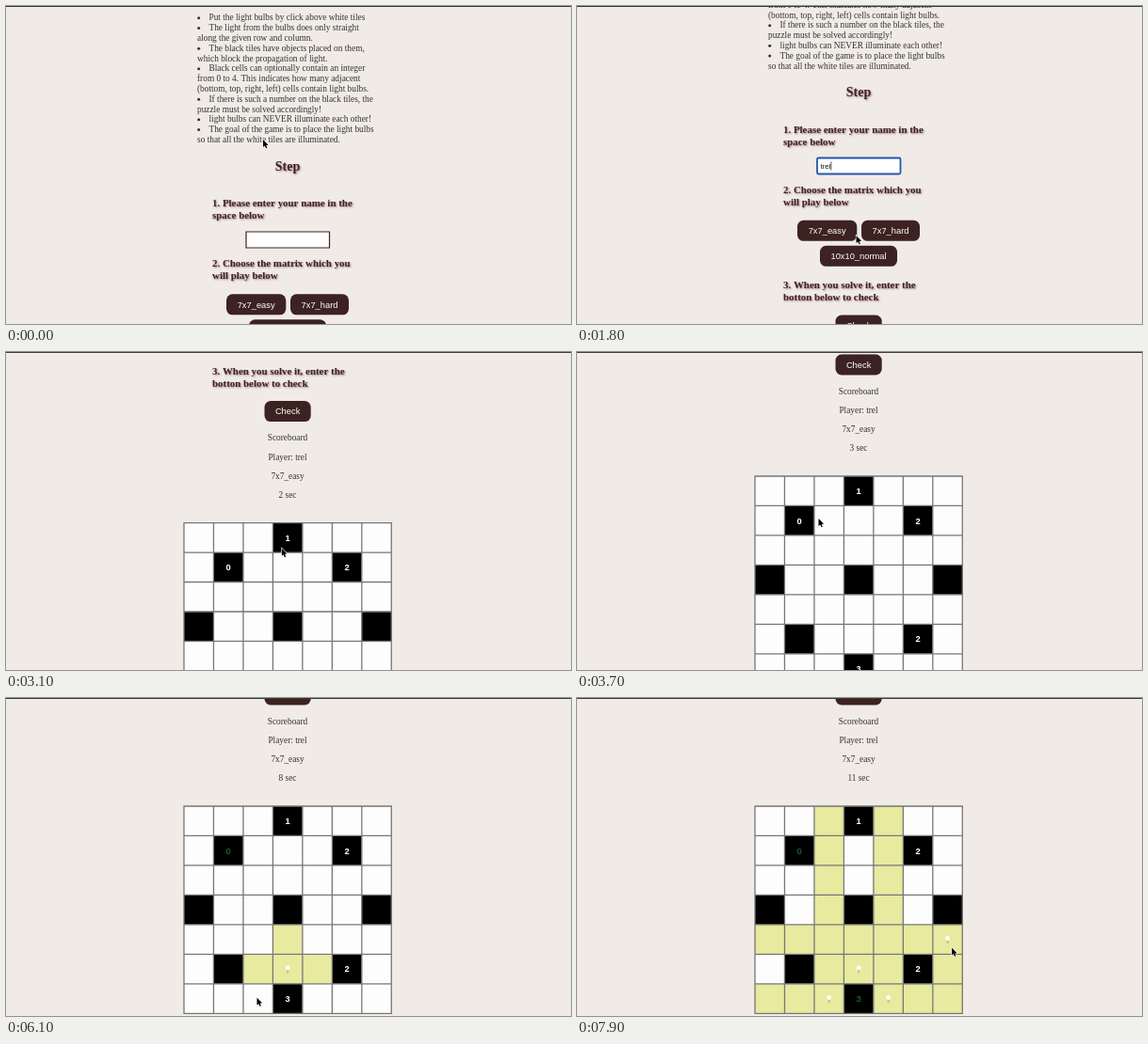
Recreate the animation shown at these times as an HTML page with a canvas. Size 600x338 px, loop 8 s.

```html
<!DOCTYPE html>
<html lang="en">
<head>
<meta charset="utf-8">
<title>Light bulb puzzle</title>
<style>
  html, body { margin: 0; width: 100%; height: 100%; overflow: hidden; background: #f0ebe6; }
  canvas { display: block; width: 600px; height: 338px; }
</style>
</head>
<body>
<canvas id="stage"></canvas>
<script>
const W = 600, H = 338, LOOP = 8000, STEP = 100;
const canvas = document.getElementById('stage');
const ctx = canvas.getContext('2d');
const dpr = window.devicePixelRatio || 1;
canvas.width = W * dpr;
canvas.height = H * dpr;

const SERIF = '"Liberation Serif", "Times New Roman", serif';
const SANS = '"Liberation Sans", Arial, sans-serif';
const BROWN = '#3d2222';
const PLAYER = 'trel';
const START = 1950;

// A leading * marks the first line of a bullet point.
const RULES = [
  '*Put the light bulbs by click above white tiles',
  '*The light from the bulbs does only straight',
  'along the given row and column.',
  '*The black tiles have objects placed on them,',
  'which block the propagation of light.',
  '*Black cells can optionally contain an integer',
  'from 0 to 4. This indicates how many adjacent',
  '(bottom, top, right, left) cells contain light bulbs.',
  '*If there is such a number on the black tiles, the',
  'puzzle must be solved accordingly!',
  '*light bulbs can NEVER illuminate each other!',
  '*The goal of the game is to place the light bulbs',
  'so that all the white tiles are illuminated.'
];

const BOARD = ['...1...', '.0...2.', '.......', '#..#..#', '.......', '.#...2.', '...3...'];
const GRID = { x: 189, y: 536.5, cell: 31.47, n: 7 };
const DIRS = [[0, 1], [0, -1], [1, 0], [-1, 0]];

// time, row, column
const CLICKS = [[5700, 5, 3], [6200, 6, 2], [6850, 6, 4], [7500, 4, 6]];

// time, scroll offset
const SCROLL = [
  [100, 0], [500, 42], [1050, 78.5], [2050, 78.5], [2500, 215], [3000, 345], [3600, 404.5],
  [4200, 404.5], [4800, 423.5], [5200, 423.5], [5500, 421.5]
];

// time, x, y
const POINTER = [
  [0, 273, 142], [400, 278, 148], [1000, 296, 168], [1500, 298, 172], [1800, 296.5, 244],
  [1950, 282, 240], [2100, 285, 238], [2500, 308, 230], [3000, 300, 215], [3600, 257, 178],
  [3700, 256.5, 177], [4100, 357, 262], [4300, 357, 262], [5200, 360.5, 204],
  [5650, 299, 286], [5800, 298, 287], [6100, 266.5, 318.5], [6300, 267, 318.5],
  [6750, 330, 317], [6950, 331, 317], [7450, 393, 257], [7600, 393, 258], [7900, 398, 265.5]
];

function track(keys, t, i) {
  if (t <= keys[0][0]) return keys[0][i];
  for (let k = 1; k < keys.length; k++) {
    const a = keys[k - 1], b = keys[k];
    if (t <= b[0]) return a[i] + (b[i] - a[i]) * (t - a[0]) / (b[0] - a[0]);
  }
  return keys[keys.length - 1][i];
}

function text(str, x, y, font, color, align = 'left') {
  ctx.font = font;
  ctx.fillStyle = color;
  ctx.textAlign = align;
  ctx.fillText(str, x, y);
}

function heading(str, x, y, size, align) {
  ctx.save();
  ctx.shadowColor = 'rgba(110, 50, 50, 0.6)';
  ctx.shadowBlur = 2 * dpr;
  ctx.shadowOffsetX = ctx.shadowOffsetY = dpr;
  text(str, x, y, `bold ${size}px ${SERIF}`, BROWN, align);
  ctx.restore();
}

function button(label, x, y, w) {
  ctx.fillStyle = BROWN;
  ctx.beginPath();
  ctx.roundRect(x, y, w, 22, 6.5);
  ctx.fill();
  text(label, x + w / 2, y + 14.4, `9.33px ${SANS}`, '#fff', 'center');
}

function nameField(t) {
  const focused = t >= 1050 && t < START;
  ctx.fillStyle = '#fff';
  ctx.strokeStyle = focused ? '#2456b0' : BROWN;
  ctx.lineWidth = focused ? 1.8 : 1.2;
  ctx.beginPath();
  ctx.roundRect(255, 240, 88.5, 17, focused ? 1.5 : 0);
  ctx.fill();
  ctx.stroke();
  if (!focused) return;
  const typed = PLAYER.slice(0, Math.max(0, Math.floor((t - 1050) / 100)));
  text(typed, 258.5, 251, `7.78px ${SANS}`, '#111');
  ctx.fillRect(258.8 + ctx.measureText(typed).width, 244, 0.7, 9);
}

function form(t) {
  RULES.forEach((line, i) => {
    const y = 15.4 + i * 10.8, item = line[0] === '*';
    if (item) {
      ctx.fillStyle = '#333';
      ctx.beginPath();
      ctx.arc(204.7, y - 2.6, 1.5, 0, 7);
      ctx.fill();
    }
    text(item ? line.slice(1) : line, item ? 215.5 : 203, y, `9.33px ${SERIF}`, '#333');
  });
  heading('Step', 299, 174.7, 14, 'center');
  [
    [213.3, '1. Please enter your name in the', 'space below'],
    [277.3, '2. Choose the matrix which you', 'will play below'],
    [378.8, '3. When you solve it, enter the', 'botton below to check']
  ].forEach(([y, a, b]) => {
    heading(a, 219, y, 10.92);
    heading(b, 219, y + 12.7, 10.92);
  });
  nameField(t);
  button('7x7_easy', 234, 306.3, 63.3);
  button('7x7_hard', 302, 306.3, 62);
  button('10x10_normal', 258, 333.3, 82);
  button('Check', 274.5, 407, 49.2);
}

function scoreboard(t) {
  const secs = Math.max(0, Math.floor((t - START) / 500));
  ['Scoreboard', 'Player: ' + PLAYER, '7x7_easy', secs + ' sec'].forEach((s, i) =>
    text(s, 299, 449.3 + i * 20.2, `9.33px ${SERIF}`, '#333', 'center'));
}

const open = (r, c) => BOARD[r] && BOARD[r][c] === '.';

function litCells(bulbs) {
  const lit = new Set();
  for (const [, r, c] of bulbs) {
    lit.add(r + ',' + c);
    for (const [dr, dc] of DIRS)
      for (let y = r + dr, x = c + dc; open(y, x); y += dr, x += dc) lit.add(y + ',' + x);
  }
  return lit;
}

function bulb(x, y) {
  ctx.fillStyle = '#c3bd95';
  ctx.fillRect(x - 1, y + 1, 2, 3.2);
  ctx.fillStyle = '#fffdf0';
  ctx.beginPath();
  ctx.arc(x, y - 1.3, 2.5, 0, 7);
  ctx.fill();
}

function board(t) {
  const { x, y, cell, n } = GRID;
  const bulbs = CLICKS.filter(k => t >= k[0]);
  const lit = litCells(bulbs);
  const has = (r, c) => bulbs.some(b => b[1] === r && b[2] === c);
  for (let r = 0; r < n; r++) {
    for (let c = 0; c < n; c++) {
      const mark = BOARD[r][c], px = x + c * cell, py = y + r * cell;
      const cx = px + cell / 2, cy = py + cell / 2;
      ctx.fillStyle = mark !== '.' ? '#000' : lit.has(r + ',' + c) ? '#e7ea9f' : '#fefdfe';
      ctx.fillRect(px, py, cell, cell);
      if (mark >= '0' && mark <= '9') {
        const count = DIRS.filter(([dr, dc]) => has(r + dr, c + dc)).length;
        const done = bulbs.length && count === +mark;
        text(mark, cx, cy + 3.4, `${done ? '' : 'bold '}9.33px ${SANS}`, done ? '#2a7a35' : '#fff', 'center');
      }
      if (has(r, c)) bulb(cx, cy);
    }
  }
  ctx.strokeStyle = '#777';
  ctx.lineWidth = 1.3;
  ctx.beginPath();
  for (let i = 0; i <= n; i++) {
    const d = i * cell, end = n * cell;
    ctx.moveTo(x + d, y - 0.6);
    ctx.lineTo(x + d, y + end + 0.6);
    ctx.moveTo(x - 0.6, y + d);
    ctx.lineTo(x + end + 0.6, y + d);
  }
  ctx.stroke();
}

function pointer(t) {
  const beam = (t >= 1000 && t < 1600) || (t >= 2400 && t < 2700);
  ctx.save();
  ctx.translate(track(POINTER, t, 1), track(POINTER, t, 2));
  ctx.beginPath();
  if (beam) {
    ctx.strokeStyle = '#222';
    ctx.lineWidth = 0.9;
    ctx.moveTo(-1.8, 0);
    ctx.quadraticCurveTo(0, 0, 0, 1.5);
    ctx.lineTo(0, 7);
    ctx.quadraticCurveTo(0, 8.5, -1.8, 8.5);
    ctx.moveTo(1.8, 0);
    ctx.quadraticCurveTo(0, 0, 0, 1.5);
    ctx.moveTo(0, 7);
    ctx.quadraticCurveTo(0, 8.5, 1.8, 8.5);
    ctx.stroke();
  } else {
    [[0, 0], [0, 8], [1.8, 6.4], [3.1, 9.3], [4.4, 8.7], [3.2, 5.9], [5.6, 5.7]]
      .forEach(p => ctx.lineTo(p[0], p[1]));
    ctx.closePath();
    ctx.strokeStyle = '#fff';
    ctx.lineWidth = 1.2;
    ctx.stroke();
    ctx.fillStyle = '#000';
    ctx.fill();
  }
  ctx.restore();
}

function draw(t) {
  ctx.setTransform(dpr, 0, 0, dpr, 0, 0);
  ctx.fillStyle = '#f0ebe6';
  ctx.fillRect(0, 0, W, H);
  ctx.save();
  ctx.translate(0, -track(SCROLL, t, 1));
  form(t);
  scoreboard(t);
  if (t >= START) board(t);
  ctx.restore();
  ctx.fillStyle = '#3a3838';
  ctx.fillRect(0, 0, W, 1);
  pointer(t);
}

const begin = performance.now();
function tick() {
  const t = (performance.now() - begin) % LOOP;
  draw(Math.floor(t / STEP) * STEP);
  requestAnimationFrame(tick);
}
tick();
</script>
</body>
</html>
```
